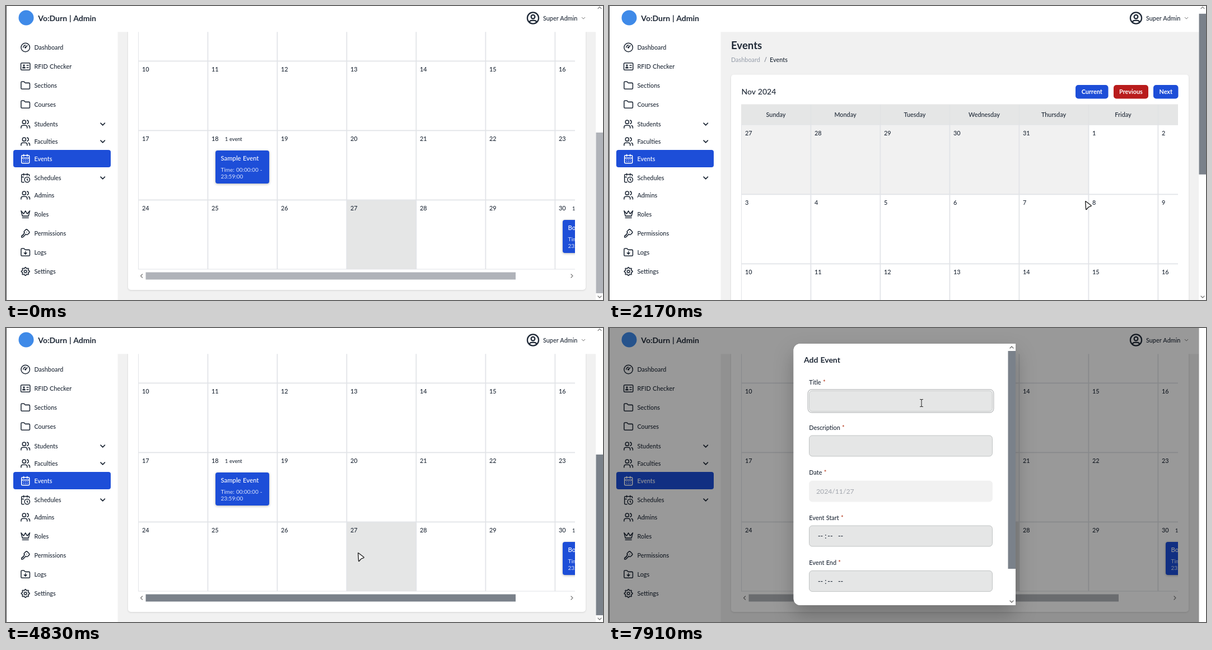
Animation, 1066 px wide and 525 px high, one loop 8000 ms. Source, as an HTML page:

```html
<!DOCTYPE html>
<html lang="en">
<head>
<meta charset="utf-8">
<title>Events calendar</title>
<style>
html, body { margin: 0; width: 100%; height: 100%; overflow: hidden; background: #fff; }
svg { display: block; font: 500 10.85px Lato, "Open Sans", sans-serif; word-spacing: .05em; }
text { white-space: pre; }
.card { filter: drop-shadow(0 1px 1.5px rgba(0, 0, 0, .12)); }
.event { filter: drop-shadow(0 1px 2px rgba(0, 0, 0, .3)); }
.dialog { filter: drop-shadow(0 17px 17px rgba(0, 0, 0, .25)); }
</style>
</head>
<body>
<svg id="stage" width="1066" height="525" viewBox="0 0 1066 525"></svg>
<script>
const INK = '#1f2937', BLUE = '#1d4ed8', LINE = '#e2e4e8', BASE = '#e5e6e6', SOFT = '#f1f1f1';
const THUMB = '#b0b3b9', THUMB_ON = '#7a818a';
const LOOP = 8000, TICK = 70, COL = 124, LEFT = 236, TOP = 212;

const rect = (x, y, w, h, fill, extra = '') =>
  `<rect x="${x}" y="${y}" width="${w}" height="${h}" fill="${fill}" ${extra}/>`;
const text = (x, y, str, { size = 10.85, fill = INK, weight = 500, anchor = 'start', extra = '' } = {}) =>
  `<text x="${x}" y="${y}" font-size="${size}" fill="${fill}" font-weight="${weight}" text-anchor="${anchor}" ${extra}>${str}</text>`;
const line = (d, color = INK, width = 1.6, extra = '') =>
  `<path d="${d}" fill="none" stroke="${color}" stroke-width="${width}" stroke-linecap="round" stroke-linejoin="round" ${extra}/>`;

// Icons on a 24 unit grid
const circle = (x, y, r) => `M${x - r} ${y}a${r} ${r} 0 1 0 ${2 * r} 0a${r} ${r} 0 1 0 ${-2 * r} 0`;
const gear = () => {
  let d = '';
  for (let i = 0; i < 96; i++) {
    const a = i / 96 * 2 * Math.PI;
    const r = 8.3 + 1.2 * Math.tanh(2.2 * Math.cos(8 * a));
    d += `${i ? 'L' : 'M'}${(12 + r * Math.cos(a)).toFixed(2)} ${(12 + r * Math.sin(a)).toFixed(2)}`;
  }
  return d + 'z' + circle(12, 12, 3);
};
const folder = 'M20 20a2 2 0 0 0 2-2V8a2 2 0 0 0-2-2h-7.9a2 2 0 0 1-1.69-.9L9.6 3.9A2 2 0 0 0 7.93 3H4a2 2 0 0 0-2 2v13a2 2 0 0 0 2 2z';
const icons = {
  gauge: circle(12, 12, 10) + circle(12, 12, 1.2) + 'M13.4 10.6L16.2 7.8M7 12a5 5 0 0 1 5-5',
  badge: 'M3.5 4h17a2 2 0 0 1 2 2v12a2 2 0 0 1-2 2h-17a2 2 0 0 1-2-2V6a2 2 0 0 1 2-2z' + circle(8.5, 9.5, 1.2) + 'M5.8 15.5c0-3 5.4-3 5.4 0zM15 9.5h4M15 14.5h4',
  folder,
  users: 'M16 21v-2a4 4 0 0 0-4-4H6a4 4 0 0 0-4 4v2' + circle(9, 7, 4) + 'M22 21v-2a4 4 0 0 0-3-3.87M16 3.13a4 4 0 0 1 0 7.75',
  calendar: 'M5 4h14a2 2 0 0 1 2 2v14a2 2 0 0 1-2 2H5a2 2 0 0 1-2-2V6a2 2 0 0 1 2-2zM16 2v4M8 2v4M3 10h18M8 14h.01M12 14h.01M16 14h.01M8 18h.01M12 18h.01M16 18h.01',
  clock: 'M21 7.5V6a2 2 0 0 0-2-2H5a2 2 0 0 0-2 2v14a2 2 0 0 0 2 2h3.5M16 2v4M8 2v4M3 10h5M17.5 17.5L16 16.3V14' + circle(16, 16, 6),
  crown: 'M2 4l3 12h14l3-12-6 7-4-7-4 7zM5 20h14',
  key: 'M16.6 3.8l3.6 3.6a2.9 2.9 0 0 1 0 4.1l-2.7 2.7a2.9 2.9 0 0 1-4 0l-.4-.4-6.5 6.6a2 2 0 0 1-1.3.6H3v-2.2a2 2 0 0 1 .5-1.3L4 17h2v-2h2v-2l2.1-2.1-.3-.3a2.9 2.9 0 0 1 0-4.1l2.7-2.7a2.9 2.9 0 0 1 4.1 0zM15 9h.01',
  logs: folder + 'M12 10v6M9 13l3 3 3-3',
  gear: gear(),
  user: circle(12, 12, 9) + circle(12, 10, 3) + 'M6.2 18.8A4 4 0 0 1 10 16h4a4 4 0 0 1 3.8 2.9',
};
const icon = (name, cx, cy, color = INK, scale = .775) =>
  line(icons[name], color, 2, `transform="translate(${cx} ${cy}) scale(${scale}) translate(-12 -12)"`);
const chevron = (x, y, turn, size = 3, color = '#777', width = 1.2) =>
  line(`M${-size} ${-size / 2}L0 ${size / 2}L${size} ${-size / 2}`, color, width, `transform="translate(${x} ${y}) rotate(${turn})"`);

function sidebar() {
  const items = [
    ['Dashboard', 'gauge', 74], ['RFID Checker', 'badge', 108], ['Sections', 'folder', 142],
    ['Courses', 'folder', 176], ['Students', 'users', 211, 1], ['Faculties', 'users', 242, 1],
    ['Events', 'calendar', 273], ['Schedules', 'clock', 307, 1], ['Admins', 'users', 338],
    ['Roles', 'crown', 372], ['Permissions', 'key', 406], ['Logs', 'logs', 440], ['Settings', 'gear', 474],
  ];
  return rect(13, 257, 174, 31, BLUE, 'rx="4"') + items.map(([label, name, y, more]) => {
    const color = label === 'Events' ? '#fff' : INK;
    return icon(name, 34.7, y, color) + text(50.5, y + 4, label, { fill: color }) +
      (more ? chevron(172.7, y, 0, 3.7, INK, 1.7) : '');
  }).join('');
}

function eventCard(x, y, title) {
  const small = { size: 10, fill: '#dbe4fb', weight: 400 };
  return text(x + 31, y + 18.5, '1 event', { size: 9.1 }) +
    rect(x + 14, y + 36, 96, 59, BLUE, 'rx="4" class="event"') +
    text(x + 23.5, y + 54, title, { size: 11.3, fill: '#fff' }) +
    text(x + 23.5, y + 73.5, 'Time: 00:00:00 -', small) +
    text(x + 23.5, y + 85.5, '23:59:00', small);
}

function calendar() {
  const days = ['Sunday', 'Monday', 'Tuesday', 'Wednesday', 'Thursday', 'Friday', 'Saturday'];
  const at = i => [LEFT + i % 7 * COL, TOP + Math.floor(i / 7) * COL];
  let out = rect(LEFT, 175.5, 868, 37, BASE) +
    rect(LEFT, TOP, 5 * COL, COL, SOFT) + rect(LEFT + 3 * COL, TOP + 4 * COL, COL, COL, BASE);
  days.forEach((day, i) => {
    const x = LEFT + i * COL;
    out += text(x + 62, 197.5, day, { anchor: 'middle' }) +
      rect(x - (i ? .5 : 0), TOP, i ? 1.8 : 1, 5 * COL, LINE) +
      (i ? rect(x, 176, 1, 36, '#dfe1e3') : '');
  });
  for (let r = 0; r < 6; r++) out += rect(LEFT, TOP + r * COL - .5, 868, r % 5 ? 1.8 : 1, LINE);
  for (let i = 0; i < 35; i++) {
    const [x, y] = at(i);
    out += text(x + 7, y + 19, i < 5 ? 27 + i : i - 4);
  }
  return out + eventCard(...at(22), 'Sample Event') + eventCard(...at(34), 'Bonus Event');
}

function page() {
  const button = (x, w, label, fill) => rect(x, 141, w, 24.5, fill, 'rx="5"') +
    text(x + w / 2, 157, label, { fill: '#fff', weight: 700, anchor: 'middle' });
  return text(218, 76.7, 'Events', { size: 18.6, weight: 700 }) +
    text(218, 100, 'Dashboard', { fill: '#9ca3af' }) + text(277, 100, '/', { fill: '#6b7280' }) + text(287, 100, 'Events') +
    rect(218, 122.5, 817, 746.5, '#fff', 'rx="5" class="card"') +
    text(236.5, 158, 'Nov 2024', { size: 14 }) +
    button(833, 58.5, 'Current', BLUE) + button(901, 62, 'Previous', '#b91c1c') + button(972, 44.5, 'Next', BLUE) +
    `<g clip-path="url(#grid)">${calendar()}</g>` +
    rect(249.5, 837.5, 660.5, 13, THUMB, 'class="thumb"') +
    chevron(242, 844, 90) + chevron(1010.5, 844, -90);
}

const BOX = { x: 329.5, y: 28, w: 396.5, h: 467, cx: 527.75, cy: 261.5 };
function boxPath(k) {
  const x = BOX.cx + (BOX.x - BOX.cx) * k, y = BOX.cy + (BOX.y - BOX.cy) * k, r = 12 * k;
  return `M${x + BOX.w * k} ${y}v${BOX.h * k}H${x + r}a${r} ${r} 0 0 1 ${-r} ${-r}V${y + r}a${r} ${r} 0 0 1 ${r} ${-r}z`;
}

function dialog() {
  const field = (y, fill = BASE, stroke = '#bcbfbf') =>
    rect(357.5, y, 327, 37, fill, `rx="5.5" stroke="${stroke}" stroke-width=".9"`);
  const label = (y, str) => text(357.3, y, `${str} <tspan class="star">*</tspan>`);
  const time = y => [[373, '--'], [385.3, ':'], [390.3, '--'], [409, '--']]
    .map(([x, s]) => text(x, y, s, { size: 12.4 })).join('');
  return `<path class="dialog" d="${boxPath(1)}" fill="#fff"/>` +
    text(348, 62, 'Add Event', { size: 14, weight: 700 }) +
    label(101, 'Title') + field(112) +
    rect(355.2, 109.7, 331.6, 41.4, 'none', 'id="ring" rx="7" stroke="#c2c4c5" stroke-width="1.5"') +
    rect(370, 123, 1, 15, INK, 'id="caret"') +
    label(181.5, 'Description') + field(192) +
    label(262, 'Date') + field(273, SOFT, SOFT) +
    text(370, 296, '2024/11/27', { size: 12.2, fill: '#a2a6ad', weight: 400, extra: 'id="date"' }) +
    label(342.5, 'Event Start') + field(353) + time(376) +
    label(423, 'Event End') + field(433.5) + time(456.7) +
    rect(712.5, 41, 13.5, 389, THUMB_ON) + chevron(719, 34.5, 180, 3, '#666') + chevron(719, 488.5, 0, 3, '#666');
}

const stage = document.getElementById('stage');
stage.innerHTML = `<defs><clipPath id="grid">${rect(LEFT, 0, 780, 900, '#000')}</clipPath></defs>` +
  rect(0, 0, 1066, 525, '#fff') + rect(199.5, 46, 854, 479, SOFT) +
  `<g id="page">${page()}</g>` +
  rect(0, 0, 1066, 46.3, '#fff') + rect(1053.5, 0, 12.5, 525, '#fff') +
  '<circle cx="36" cy="21" r="13.5" fill="#3f8ae8"/>' +
  text(57.3, 26.5, 'Vo:Durn | Admin', { size: 14, weight: 700 }) +
  icon('user', 941, 21.5, INK, 1.12) + text(959, 25.7, 'Super Admin') + chevron(1031, 21.7, 0, 2.8, '#777', 1) +
  `<g id="side">${sidebar()}</g>` +
  `<g id="bar">${rect(1053.5, 0, 12.5, 287, THUMB, 'id="knob" class="thumb"')}${chevron(1060, 3.2, 180)}${chevron(1060, 519.5, 0)}</g>` +
  rect(0, 0, 1, 525, '#4a4a4c') +
  '<path id="shade" fill="#000" fill-rule="evenodd"/>' +
  `<g id="dialog">${dialog()}</g>` +
  '<path id="arrow" d="M1.2 1.4Q1 .2 2.1 1L11.2 8Q12.2 9 10.8 9.6L7.3 10.8Q6.3 11.2 5.6 12.2L3.4 15Q2.3 16.2 2.1 14.6Z" fill="#fff" stroke="#222" stroke-width="1.4" stroke-linejoin="round"/>' +
  line('M-2.5 -6.5h1.5q1 0 1 1q0 -1 1 -1h1.5M0 -5.5v11M-2.5 6.5h1.5q1 0 1 -1q0 1 1 1h1.5', '#222', 1, 'id="beam"');

const $ = id => document.getElementById(id);
const thumbs = document.querySelectorAll('.thumb'), stars = document.querySelectorAll('.star');

// Rows of [time, value, ...], linear between rows
const scrollKeys = [[0, 362], [1610, 362], [1680, 290], [1750, 190], [1820, 171], [1890, 171], [1960, 140], [2030, 70],
  [2100, 18], [2170, 0], [3220, 0], [3290, 90], [3360, 181], [3570, 181], [3640, 235], [3710, 322], [3780, 362]];
const cursorKeys = [[1190, 1050, 300], [1400, 960, 330], [1610, 852, 349], [1680, 849.5, 348], [4060, 849.5, 348],
  [4130, 838, 328], [4270, 740, 291], [4410, 640, 310], [4480, 592, 335], [4550, 569, 360], [4620, 600, 388],
  [4690, 627.5, 401], [6790, 627.5, 401], [6860, 620, 360], [6930, 600, 290], [7000, 572, 215], [7070, 553, 165], [7140, 547, 140]];
const beamKeys = [[7280, 556, 137], [7420, 558, 134]];
const openKeys = [[6370, 0], [6440, .26], [6510, .7], [6580, .925], [6650, .98], [6720, 1]];

function sample(keys, t) {
  const n = keys.findIndex(k => k[0] > t);
  if (n === 0) return keys[0].slice(1);
  if (n < 0) return keys[keys.length - 1].slice(1);
  const a = keys[n - 1], b = keys[n], p = (t - a[0]) / (b[0] - a[0]);
  return a.slice(1).map((v, i) => v + (b[i + 1] - v) * p);
}
const show = (id, on) => { $(id).style.display = on ? '' : 'none'; };
const move = (id, x, y) => $(id).setAttribute('transform', `translate(${x} ${y})`);

function draw(now) {
  const t = Math.floor(now % LOOP / TICK) * TICK;
  const [scroll] = sample(scrollKeys, t), [open] = sample(openKeys, t);

  move('page', 0, -Math.round(scroll));
  move('side', 0, t >= 1680 && t < 2030 ? 1 : 0);
  $('knob').setAttribute('y', 13.8 + scroll * .586);
  const hover = t >= 1190 && t < 6440;
  thumbs.forEach(el => el.setAttribute('fill', hover ? THUMB_ON : THUMB));
  show('bar', !open);

  show('shade', open);
  show('dialog', open);
  if (open) {
    const k = .9 + .1 * open;
    $('shade').setAttribute('d', 'M1 0H1053.5V525H1z' + boxPath(k));
    $('shade').setAttribute('opacity', .4 * Math.pow(open, .7));
    $('dialog').setAttribute('opacity', open);
    $('dialog').setAttribute('transform', `translate(${BOX.cx} ${BOX.cy}) scale(${k}) translate(${-BOX.cx} ${-BOX.cy})`);
    stars.forEach(el => el.setAttribute('fill', t > 6580 ? '#b4381c' : INK));
    show('date', t > 6580);
    show('ring', t >= 7350);
    show('caret', t >= 7420 && t < 7910);
  }

  show('arrow', t >= 1190 && t < 7280);
  show('beam', t >= 7280);
  move('arrow', ...sample(cursorKeys, t));
  move('beam', ...sample(beamKeys, t));
}

function frame() {
  draw(performance.now());
  requestAnimationFrame(frame);
}
frame();
</script>
</body>
</html>
```
